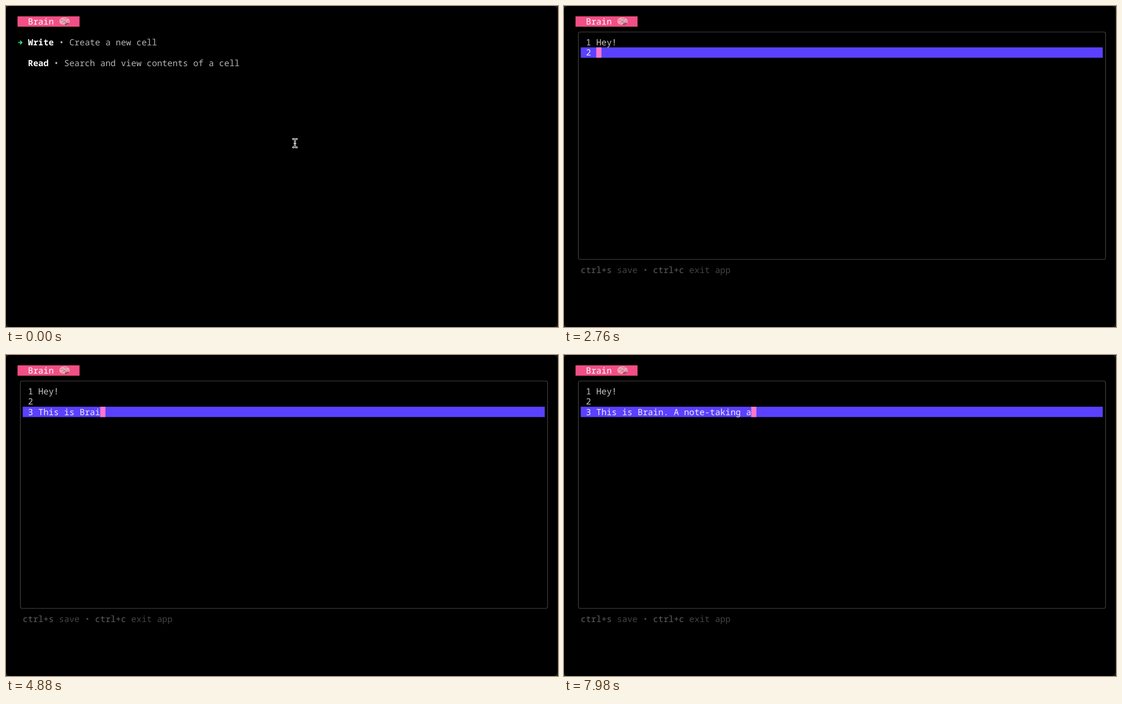
An HTML page for the animation above (8 s loop, 981x571 px).

```html
<!DOCTYPE html>
<html lang="en">
<head>
<meta charset="utf-8">
<title>Brain</title>
<style>
  html, body { margin: 0; height: 100%; overflow: hidden; background: #1b1b1b; }
  svg { display: block; width: 981px; height: 571px; }
  text { font: 15.3px "Noto Sans Mono", "DejaVu Sans Mono", monospace; white-space: pre; text-rendering: geometricPrecision; fill: #b4b4b4; }
  .bold { font-weight: 700; fill: #fff; }
  .title { font-weight: 500; fill: #fff; }
  .key { fill: #5e5e5e; }
  .hint { fill: #434343; }
</style>
</head>
<body>
<svg viewBox="0 0 981 571">
  <rect width="980" height="571" rx="8"/>
  <rect x="20.5" y="18.4" width="110.2" height="18.4" fill="#f24f86"/>
  <g id="brain" transform="translate(104 27.3)" stroke-linecap="round">
    <path d="M-9 1C-10-4-5-7 0-7C6-7 10-3 9 1C9 4 6 5 4 5L3 8L0 6C-4 6-9 5-9 1Z" fill="#f0a9b8"/>
    <path d="M0 5C4 2 8 4 8 1C8 5 6 6 4 5L3 8Z" fill="#8d4358"/>
    <path d="M-7-1Q-4-4-2-1T3-2M-4 3Q0 0 2 2T7-1M-1-5Q2-3 5-5" fill="none" stroke="#b65d76"/>
  </g>
  <g id="menu">
    <path d="M21.5 65H27M25 61.8L28.4 65L25 68.2" fill="none" stroke="#3df282" stroke-width="1.6"/>
    <path d="M509.5 235.5H512L513.5 237L515 235.5H517.5V237.5H515.5L514.5 239V249L515.5 250.5H517.5V252.5H515L513.5 251L512 252.5H509.5V250.5H511.5L512.5 249V239L511.5 237.5H509.5Z" stroke="#eee" stroke-width="1.1"/>
    <path d="M511 244.5H516" stroke="#eee"/>
  </g>
  <g id="editor">
    <rect x="25.5" y="46.2" width="937" height="404.6" rx="3.5" fill="none" stroke="#444" stroke-width="1.1"/>
    <rect id="bar" x="29.7" width="927.8" height="18.4" fill="#5a41ff"/>
    <rect id="cursor" width="9.2" height="18.4" fill="#ff77cc"/>
  </g>
</svg>
<script>
const CELL = 9.18, ROW = 18.4, LEFT = 20.6, LOOP = 8000, OPEN = 20;
const $ = id => document.getElementById(id);
const colX = c => LEFT + c * CELL;
const rowY = r => ROW * (r + 1);

function put(parent, col, row, str, cls = "") {
  const t = document.createElementNS("http://www.w3.org/2000/svg", "text");
  t.setAttribute("x", colX(col));
  t.setAttribute("y", rowY(row) + 14.6);
  t.setAttribute("class", cls);
  t.textContent = str;
  return parent.appendChild(t);
}

put($("brain").parentNode, 2, 0, "Brain", "title");
const menu = $("menu"), editor = $("editor");
put(menu, 2, 2, "Write", "bold");
put(menu, 8, 2, "• Create a new cell");
put(menu, 2, 4, "Read", "bold");
put(menu, 7, 4, "• Search and view contents of a cell");
put(editor, 1, 24, "ctrl+s", "key");
put(editor, 8, 24, "save •", "hint");
put(editor, 15, 24, "ctrl+c", "key");
put(editor, 22, 24, "exit app", "hint");
const rows = [0, 1, 2].map(i => put(editor, 2, 2 + i, ""));

// One time in ms for each key pressed.
const typed = "Hey!\n\nThis is Brain. A note-taking a";
const keys = [
  1660, 1830, 1980, 2200, 2760, 2980,
  3280, 3420, 3560, 3690, 3840,
  4060, 4180, 4300, 4460, 4580, 4700, 4800, 4900, 5040, 5220,
  5620, 5780,
  6060, 6200, 6330, 6450, 6650, 6850, 6990, 7110, 7230, 7350, 7470, 7620, 7820
];

function draw(t) {
  const open = t >= OPEN;
  menu.style.display = open ? "none" : "";
  editor.style.display = open ? "" : "none";
  const lines = typed.slice(0, keys.filter(k => k <= t).length).split("\n");
  const last = lines.length - 1;
  rows.forEach((row, i) => {
    row.textContent = i <= last ? `${i + 1} ${lines[i]}` : "";
    row.style.fill = i === last ? "#f0edff" : "#c8c8c8";
  });
  const y = rowY(2 + last);
  $("bar").setAttribute("y", y);
  $("cursor").setAttribute("y", y);
  $("cursor").setAttribute("x", colX(4 + lines[last].length));
}

const start = performance.now();
function tick() {
  draw((performance.now() - start) % LOOP);
  requestAnimationFrame(tick);
}
draw(0);
requestAnimationFrame(tick);
</script>
</body>
</html>
```
